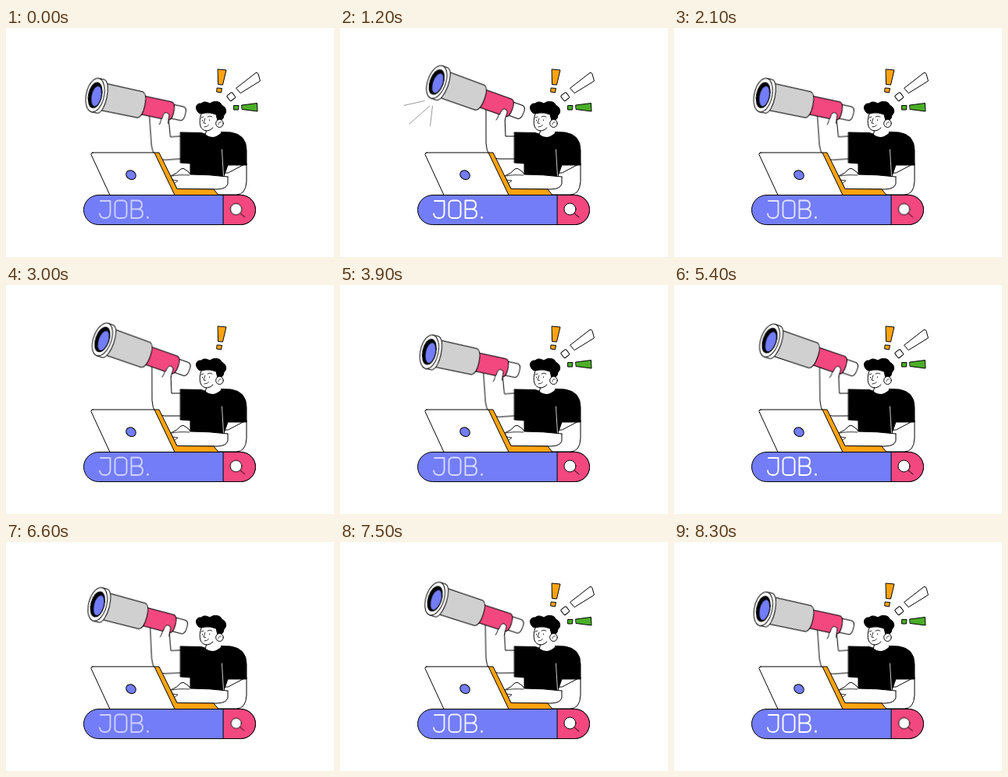
These frames come from a looping animation (420x294 px, 8400 ms). An HTML page:

```html
<!DOCTYPE html>
<html lang="en">
<head>
<meta charset="utf-8">
<title>Job search</title>
<style>
  html, body { margin: 0; width: 100%; height: 100%; overflow: hidden; background: #fff; }
  svg { display: block; width: 100vw; height: 100vh; }
  .ink { stroke: #000; stroke-width: 1; stroke-linejoin: round; stroke-linecap: round; }
  .white { fill: #fff; }
  .line { fill: none; }
  .orange { fill: #ffa30f; }
  .pink { fill: #f2487f; }
  .blue { fill: #737df8; }
  .grey { fill: #d0d0d0; }
  .green { fill: #4aae27; }

  .anim { animation: 2040ms linear infinite paused; }
  .scope { transform-origin: 242px 148px; animation-name: aim; --low: -8deg; }
  .arm { transform-origin: 223px 160px; animation-name: aim; --low: -4deg; }
  .rays { stroke: #999; stroke-width: 1; fill: none; stroke-dasharray: 1; animation-name: shine; }
  .mark1 { transform-origin: 273px 79px; animation-name: pop1; }
  .mark2 { transform-origin: 288px 88px; animation-name: pop2; }
  .mark3 { transform-origin: 295px 102px; animation-name: pop3; }
  .glass { transform-origin: 297px 235px; animation-name: pulse; }
  .word { animation-name: glow; animation-duration: 1020ms; }

  @keyframes aim {
    0%, 2%, 95%, 100% { transform: rotate(var(--low)); animation-timing-function: cubic-bezier(.37, 0, .63, 1); }
    55% { transform: rotate(0deg); animation-timing-function: cubic-bezier(.37, 0, .63, 1); }
  }
  @keyframes shine {
    0%, 51% { stroke-dashoffset: 1; opacity: 0; }
    51.1% { stroke-dashoffset: 1; opacity: 1; }
    57%, 60% { stroke-dashoffset: 0; opacity: 1; }
    64%, 100% { stroke-dashoffset: 0; opacity: 0; }
  }
  @keyframes pop1 {
    0%, 22% { transform: scale(1); }
    23%, 42% { transform: scale(0); }
    45%, 100% { transform: scale(1); }
  }
  @keyframes pop2 {
    0%, 22% { transform: scale(1); }
    23%, 48% { transform: scale(0); }
    51% { transform: scale(1.04); }
    54%, 100% { transform: scale(1); }
  }
  @keyframes pop3 {
    0%, 22% { transform: scale(1); }
    23%, 51% { transform: scale(0); }
    55% { transform: scale(1.05); }
    58%, 100% { transform: scale(1); }
  }
  @keyframes pulse {
    0% { transform: scale(.97); }
    25% { transform: scale(.87); }
    50%, 90% { transform: scale(1); }
    100% { transform: scale(.97); }
  }
  @keyframes glow {
    0%, 100% { opacity: .65; }
    14%, 30% { opacity: 1; }
    47%, 70% { opacity: .65; }
    82% { opacity: .72; }
  }
</style>
</head>
<body>
<svg viewBox="0 0 420 294" preserveAspectRatio="none">
  <g class="anim arm ink">
    <path class="white" d="M187 103 L187 148 Q188 168 203 168 L226 168 L226 139 L212 139 L211 112" />
  </g>

  <g class="anim rays">
    <path pathLength="1" d="M108.500 93.500 L81.500 99.500" />
    <path pathLength="1" d="M115 100 L88.500 123.500" />
    <path pathLength="1" d="M118.500 100 L115.500 126" />
  </g>

  <g class="anim scope ink">
    <g transform="translate(124 69) rotate(20)">
      <path class="white" d="M98 -9 L114 -9 Q119 -8 118 0 Q118 8 114 9 L98 9 Z" />
      <path class="pink" d="M60 -12 L98 -12 Q103 -11 103 0 Q103 11 98 12 L60 12 Z" />
      <path class="grey" d="M8 -17.500 L59 -17 Q65 -15 65 0 Q65 15 59 17 L8 17.500 Z" />
      <path class="white" d="M0 -22 L7 -22 C18 -21 18 21 7 22 L0 22 Z" />
      <ellipse class="white" rx="11.500" ry="22" />
      <ellipse rx="8.500" ry="16.500" />
      <ellipse class="blue" cx="1.800" cy="1" rx="6.500" ry="13.500" />
    </g>
    <path class="white" d="M200 118 C203 115 202 112 205 110 C207 105 210 102 213 105 C216 108 212 112 211.500 118" />
  </g>

  <g class="ink">
    <path class="white" d="M308 174 L308 197 Q307 214 295 214 L216 214 L216 188 L284 186 Z" />
    <path d="M223.500 134 L250 134.500 Q263 140 275 133.500 L288 134 Q308 137 308 157 L308 176 L284 176 L279 190.500 L236 190 L236 174 L223.500 173 Z" />
    <path class="line" style="stroke:#fff;stroke-width:.8" d="M276.500 156 L278.500 190" />

    <path class="white" style="stroke:none" d="M250 108 L248.500 124 Q249 132 257 132 L256 137 Q265 144 275 135 L275 108 Z" />
    <path class="line" d="M250 110 Q247 119 249 126 Q251 132 258 132 Q263 131 265 128 M256.500 132 L255.500 136" />
    <path d="M247 109 C241 104 243 96 250 97 C254 93 259 96 261 97 C267 92 276 95 276 99 C283 102 283 109 279 112 Q279 116 276 118 L271 119 L269 111 Q261 108 255 109 Q250 111 247 109 Z" />
    <ellipse class="white" cx="273.500" cy="122.500" rx="4.800" ry="5" />
    <path class="line" stroke-width=".7" d="M272 124 Q272 120 275.500 121" />
    <path class="line" d="M250 115 L253 114 M258 114 Q261 112 264 114 M255 116 L253 122 L255.500 122.500 M254 127 Q258 127 259.500 124.500" style="stroke-width:.8" />
    <path d="M251.500 118.500 v.5 M260.500 118 v.5" />

    <path class="white" d="M284 191 L284 200 Q282 207 270 207 L219 207 L211 190 Q219 187 224 181 Q227 179 230 182 Q235 185 236 188 Q260 188 284 191" />
    <path class="line" style="stroke-width:.8" d="M213 190 Q220 188 235 189 M213 195 L220 196 L215 200" />

    <path class="orange" d="M189 160 L196 160 L219 206.500 L266 207 L272 214.500 L215 214.500 Z" />
    <path class="white" d="M111 160 L190 160 L216 214.500 L133 214.500 L109 162.500 Q108.500 160 111 160 Z" />
    <ellipse class="blue" cx="160" cy="188.700" rx="6.600" ry="5.500" transform="rotate(32 160 188.700)" />

    <rect class="blue" x="99.500" y="214.500" width="220" height="38" rx="19" />
    <path class="pink" d="M278.500 214.500 H300.500 A19 19 0 0 1 300.500 252.500 H278.500 Z" />
    <g class="anim glass">
      <path class="line" d="M299.500 237.500 L306 243" />
      <circle class="white" cx="294.500" cy="232.500" r="7.500" />
    </g>
  </g>

  <g class="anim word" role="img" aria-label="JOB." fill="none" stroke="#fff" stroke-width="1.900" stroke-linecap="round" stroke-linejoin="round">
    <path d="M121 222 H133.500 V238 Q133 244 127 244 Q120.500 244 120 238.500" />
    <rect x="139.500" y="221.500" width="15" height="22.500" rx="4.500" />
    <path d="M160.500 221.500 H169 Q174 222 174 227 Q174 232 169 232.500 H160.500 M169 232.500 Q175 233 175 238 Q175 244 169 244 H160.500 V221.500" />
    <path d="M181.500 243 v.6" stroke-width="2.600" />
  </g>

  <g class="ink">
    <g class="anim mark1 orange">
      <path d="M271.500 53 L282 54 L277.500 73 L272 72.500 Z" />
      <path d="M270.500 77 L276.500 77.500 L275.500 83 L270 82 Z" />
    </g>
    <g class="anim mark2 white">
      <path d="M295 77 L320 57.500 Q322 56.500 323 59 L325.500 68 L300.500 83.500 Z" />
      <rect x="284" y="84" width="8.500" height="8.500" rx="1.500" transform="rotate(-38 288.200 88.200)" />
    </g>
    <g class="anim mark3 green">
      <path d="M302 99 L321.500 96.500 L322 107 L302.500 104.500 Z" />
      <path d="M292 99.500 L298 99.500 L297.500 105 L292 105 Z" />
    </g>
  </g>
</svg>
<script>
  const LOOP = 8400, STEP = 100;
  const animations = document.getAnimations();
  const start = performance.now();

  function draw() {
    const elapsed = (performance.now() - start) % LOOP;
    const time = Math.floor(elapsed / STEP) * STEP;
    for (const animation of animations) animation.currentTime = time;
    requestAnimationFrame(draw);
  }
  draw();
</script>
</body>
</html>
```
